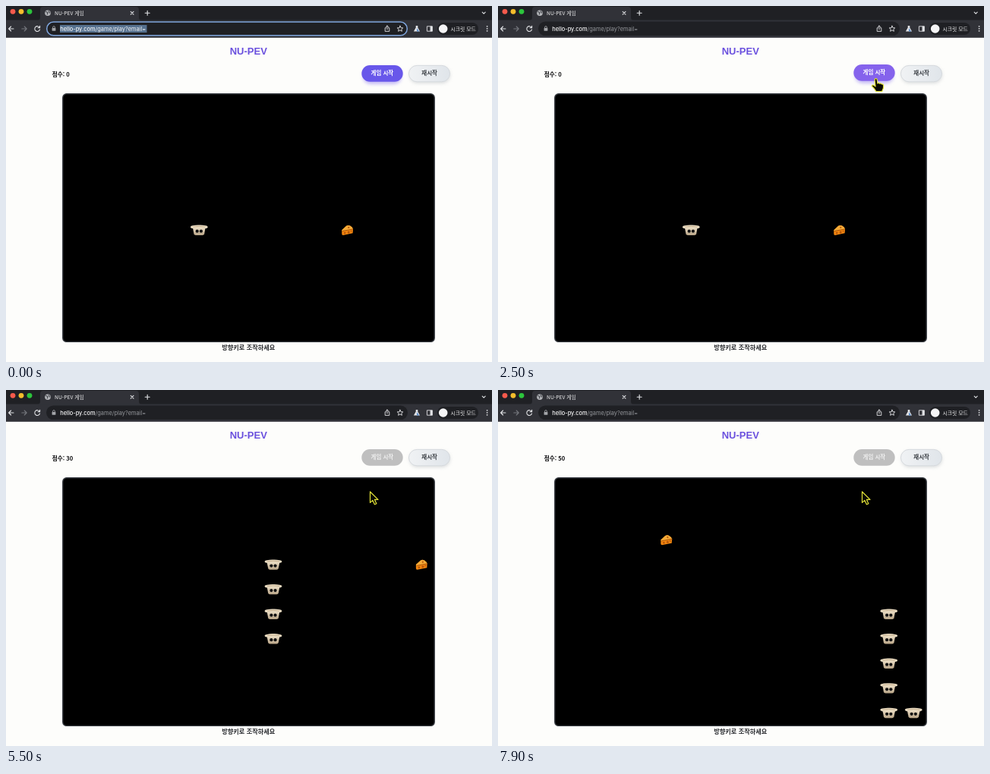
These frames come from a looping animation (640 by 469 pixels, 8 s). An HTML page:

```html
<!DOCTYPE html>
<html lang="ko">
<head>
<meta charset="utf-8">
<title>NU-PEV 게임</title>
<style>
  html, body { margin: 0; width: 100%; height: 100%; overflow: hidden; background: #fdfdfb; }
  svg { display: block; width: 100vw; height: 100vh; }
  text { font-family: "Noto Sans CJK KR", "Noto Sans CJK JP", "Noto Sans CJK", sans-serif; }
  .latin { font-family: Inter, Roboto, sans-serif; }
  .line { fill: none; stroke: #e2e3e6; stroke-width: 1.1; stroke-linecap: round; stroke-linejoin: round; }
  .mid { text-anchor: middle; }
</style>
</head>
<body>
<svg viewBox="0 0 640 469" xmlns="http://www.w3.org/2000/svg">
  <defs>
    <linearGradient id="pale" x1="0" x2="1">
      <stop offset="0" stop-color="#f0f2f4"/><stop offset="1" stop-color="#e0e5ea"/>
    </linearGradient>
    <linearGradient id="crust" x1="0" y1="0" x2="0" y2="1">
      <stop offset="0" stop-color="#eadcc4"/><stop offset="1" stop-color="#b9a587"/>
    </linearGradient>
    <filter id="soft" x="-30%" y="-60%" width="160%" height="240%"><feGaussianBlur stdDeviation="2"/></filter>
    <g id="pie">
      <path d="M-8.4-3.5 L-6.8 4.8 Q-6.4 6.5 -4.4 6.6 H4.4 Q6.4 6.5 6.8 4.8 L8.4-3.5Z" fill="url(#crust)"/>
      <path d="M-11.5-4.2 Q-11-6-8.5-6 Q-4-7 0-6.8 Q4-7 8.5-6 Q11-6 11.5-4.2 Q11-2.2 8.6-2.4 Q0-1.6-8.6-2.4 Q-11-2.2-11.5-4.2Z" fill="#e8dac0"/>
      <path d="M-8-4.3 Q0-5.8 8-4.3" fill="none" stroke="#c4ad8c" stroke-width=".9"/>
      <circle cx="-2.6" cy="1.3" r="2.1" fill="#111"/><circle cx="2.6" cy="1.3" r="2.1" fill="#111"/>
    </g>
    <g id="cheese">
      <path d="M-7.4-.2 L-1.5-5.6 Q1-7 3.5-5.8 Q6.8-4.2 7.4-1.4 L7 4 L-5.8 6.6 Q-7.4 6.4-7.4 4.6Z" fill="#f0850f"/>
      <path d="M-7.4-.2 L-1.5-5.6 Q1-7 3.5-5.8 Q6.8-4.2 7.4-1.4 L-6.5 1.2Z" fill="#f5ab38"/>
      <path d="M-6.5 1.2 L7.4-1.4" stroke="#a85006" stroke-width=".9"/>
      <g fill="#b4540a"><circle cx="-3.4" cy="3.6" r="1.3"/><circle cx="1.6" cy="2.6" r="1.5"/><circle cx="5" cy="1.2" r=".9"/><circle cx="1.6" cy="-3.6" r="1.1"/></g>
    </g>
  </defs>

  <rect width="640" height="469" fill="#fdfdfb"/>

  <g id="browser">
    <rect width="640" height="19" fill="#1f2024"/>
    <path d="M41 19 Q45 19 45 15 V5 Q45 1 49 1 H171 Q175 1 175 5 V15 Q175 19 179 19Z" fill="#313238"/>
    <rect y="18.5" width="640" height="23.3" fill="#313238"/>
    <circle cx="9" cy="7.3" r="3.4" fill="#f65a4c"/>
    <circle cx="20" cy="7.3" r="3.4" fill="#f5bd2c"/>
    <circle cx="31" cy="7.3" r="3.4" fill="#2cc53c"/>
    <circle cx="55" cy="9.3" r="3.8" fill="#b4b6ba"/>
    <path d="M52.3 7.4 L55 8.5 L54.2 11.4 M56 6.2 L57.8 9.5" stroke="#45474d" stroke-width="1.2" fill="none"/>
    <text x="64" y="11.8" font-size="6.8" fill="#eeeeef">NU-PEV 게임</text>
    <g class="line">
      <path d="M164.2 7.3 l3.8 3.8 m0 -3.8 l-3.8 3.8"/>
      <path d="M183.2 9.3 h6 m-3 -3 v6"/>
      <path d="M627.2 8.2 l2 2 l2 -2"/>
      <path d="M10 30 H3.6 m3 -3 l-3 3 l3 3"/>
      <path d="M20.8 30 h6.4 m-3 -3 l3 3 l-3 3" stroke="#74767c"/>
      <path d="M44.2 28.4 A3.4 3.4 0 1 0 44.5 31 M44.6 26.3 v2.5 h-2.5"/>
    </g>
    <rect x="53" y="20.5" width="476" height="18.6" rx="9.3" fill="#1f2024"/>
    <rect id="ring" x="53.7" y="21" width="474.6" height="17.8" rx="8.9" fill="none" stroke="#7fa5dc" stroke-width="1.5"/>
    <rect x="60.6" y="29" width="4.8" height="3.8" rx=".6" fill="#a4a6aa"/>
    <path d="M61.6 29 v-1 a1.4 1.4 0 0 1 2.8 0 v1" class="line" style="stroke:#a4a6aa;stroke-width:.8"/>
    <rect id="mark" x="71" y="25" width="114.5" height="10" fill="#56718f"/>
    <text class="latin" x="71.3" y="32.7" font-size="7.4" fill="#f6f6f7"><tspan font-weight="500">hello-py.com</tspan><tspan id="path">/game/play?email=</tspan></text>
    <g class="line" style="stroke-width:.9">
      <path d="M500.4 28.8 h-1.2 v4.6 h5.6 v-4.6 h-1.2 M502 31 v-5 m-1.6 1.5 l1.6-1.6 l1.6 1.6"/>
      <path d="M519 26.2 l1.1 2.5 2.7.2 -2 1.8 .6 2.6 -2.4-1.4 -2.4 1.4 .6-2.6 -2-1.8 2.7-.2Z"/>
      <path d="M554.8 26.8 h6.6 v6.4 h-6.6Z"/>
    </g>
    <path d="M558.6 26.8 h2.8 v6.4 h-2.8Z M539.7 26 h2.6 v2.5 l2.8 4.9 h-8.2 l2.8-4.9Z" fill="#e2e3e6"/>
    <path d="M541 29 l3.2 4.4 h-3.2Z" fill="#5b8dca"/>
    <rect x="568" y="22" width="54" height="16" rx="8" fill="#1f2024"/>
    <circle cx="575.7" cy="30" r="5.8" fill="#f5f5f6"/>
    <text x="585.5" y="32.5" font-size="6.8" fill="#eeeeef">시크릿 모드</text>
    <g fill="#e2e3e6"><circle cx="633.6" cy="26.8" r=".9"/><circle cx="633.6" cy="29.8" r=".9"/><circle cx="633.6" cy="32.8" r=".9"/></g>
  </g>

  <text class="mid" x="319.3" y="64.3" font-size="13" font-weight="700" fill="#6a50de" style="font-family:'Liberation Sans',Arial,sans-serif">NU-PEV</text>
  <text id="score" x="60.7" y="92.7" font-size="7.6" font-weight="700" fill="#0c0c0e"></text>

  <g id="start">
    <rect id="glow" x="470" y="83" width="51" height="20" rx="10" fill="#8d7aee" opacity=".5" filter="url(#soft)"/>
    <rect id="face" x="468.3" y="78" width="54.4" height="21.8" rx="10.9"/>
    <text id="label" class="mid" x="495.4" y="91.3" font-size="7.5" font-weight="700">게임 시작</text>
  </g>
  <rect x="531" y="80" width="54" height="22" rx="11" fill="#c6cace" opacity=".6" filter="url(#soft)"/>
  <rect x="530.5" y="78.4" width="54" height="21.4" rx="10.7" fill="url(#pale)" stroke="#d6dade"/>
  <text class="mid" x="557.6" y="91.3" font-size="7.5" font-weight="700" fill="#3c4046">재시작</text>

  <rect x="74.8" y="115.8" width="489.4" height="326.6" rx="5" fill="#000" stroke="#34383e" stroke-width="1.4"/>
  <g id="snake"></g>
  <use id="food" href="#cheese"/>
  <text class="mid" x="319.3" y="453.2" font-size="8.2" font-weight="700" fill="#2a2c30">방향키로 조작하세요</text>

  <g id="cursor" fill="#0a0a02" stroke="#e2e238" stroke-width="1.2" stroke-linejoin="round">
    <path id="arrow" d="M.5 1 V15.4 L3.9 12.4 L6.4 17.8 L8.9 16.7 L6.5 11.4 H11Z"/>
    <path id="hand" d="M-2 1 Q-1.8-.4-.4-.4 Q1 -.4 1.2 1 L1.8 5.8 Q3.6 4.6 4.6 6.2 Q6.3 5.2 7.2 6.9 Q9.3 6.4 9.6 8.6 L9.4 12 L7.6 16.4 H-.2 L-2.6 12.8 L-5.8 9.4 Q-5.6 7.4-3.4 8.2 L-1 10Z"/>
  </g>
</svg>
<script>
const LOOP = 8000, FRAME = 100;
const FIRST_MOVE = 2704, TICK = 148;
const BLUR_AT = 1300, HOVER_AT = 1400, PLAY_AT = 2560;
const CELL = 32.55, LEFT = 75.3, TOP = 116.3;

const MOVES = "RRRRRR" + "UULL" + "DDDDL" + "UUUU" + "RRRRRR" + "DDDDDDL" + "UUUU";
const DIRS = { R: [1, 0], L: [-1, 0], U: [0, -1], D: [0, 1] };
const FOODS = [[11, 5], [9, 3], [8, 7], [14, 3], [13, 9], [4, 2]];
// time, x, y of the pointer tip
const POINTER = [[1000, 545, 160], [1500, 501, 108], [1600, 500, 106], [1900, 499, 98],
                 [2600, 498, 96], [3000, 485, 134], [3300, 482, 135], [3500, 479, 133]];

const $ = id => document.getElementById(id);
const show = (el, on) => el.setAttribute("display", on ? "inline" : "none");
const place = (el, [c, r]) =>
  el.setAttribute("transform", `translate(${LEFT + (c + .5) * CELL} ${TOP + (r + .5) * CELL})`);

const pies = FOODS.map(() => {
  const pie = document.createElementNS("http://www.w3.org/2000/svg", "use");
  pie.setAttribute("href", "#pie");
  return $("snake").appendChild(pie);
});

function play(steps) {
  const body = [[5, 5]];
  let eaten = 0;
  for (const move of MOVES.slice(0, steps)) {
    const [dx, dy] = DIRS[move], [x, y] = body[0];
    body.unshift([x + dx, y + dy]);
    const [fx, fy] = FOODS[eaten];
    if (x + dx === fx && y + dy === fy) eaten++;
    else body.pop();
  }
  return { body, eaten };
}

function pointerAt(t) {
  const next = POINTER.findIndex(p => p[0] > t);
  if (next < 0) return POINTER.at(-1).slice(1);
  const [t0, x0, y0] = POINTER[Math.max(0, next - 1)], [t1, x1, y1] = POINTER[next];
  const k = t1 > t0 ? (t - t0) / (t1 - t0) : 0, e = k * k * (3 - 2 * k);
  return [x0 + (x1 - x0) * e, y0 + (y1 - y0) * e];
}

function draw(t) {
  const { body, eaten } = play(Math.max(0, Math.floor((t - FIRST_MOVE) / TICK) + 1));
  pies.forEach((pie, i) => {
    show(pie, i < body.length);
    if (body[i]) place(pie, body[i]);
  });
  place($("food"), FOODS[eaten]);
  $("score").textContent = `점수: ${eaten * 10}`;

  const focused = t < BLUR_AT, playing = t >= PLAY_AT, hover = t >= HOVER_AT && !playing;
  show($("ring"), focused);
  show($("mark"), focused);
  $("path").setAttribute("fill", focused ? "#f6f6f7" : "#94969b");
  $("start").setAttribute("transform", `translate(0 ${hover ? -1 : 0})`);
  $("face").setAttribute("fill", playing ? "#bfbfbf" : hover ? "#8563ec" : "#6857ea");
  $("label").setAttribute("fill", playing ? "#eeeeee" : "#ffffff");
  show($("glow"), !playing);

  const [x, y] = pointerAt(t), onButton = t >= HOVER_AT && t < 2700;
  show($("cursor"), t >= POINTER[0][0]);
  show($("hand"), onButton);
  show($("arrow"), !onButton);
  $("cursor").setAttribute("transform", `translate(${x} ${y})`);
}

const began = performance.now();
function loop() {
  const t = (performance.now() - began) % LOOP;
  draw(Math.floor(t / FRAME) * FRAME);
  requestAnimationFrame(loop);
}
loop();
</script>
</body>
</html>
```
